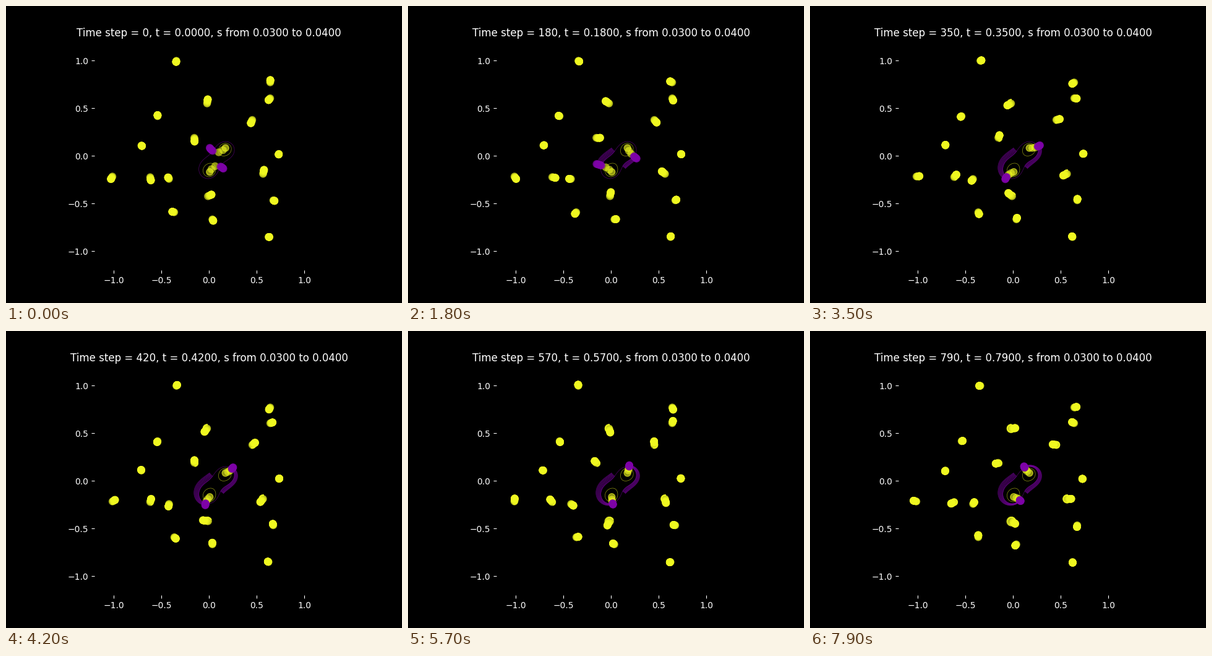
A matplotlib script that plays this animation: 640 by 480 pixels, repeating every 8000 ms.

```python
import numpy as np
import matplotlib.pyplot as plt
from matplotlib.animation import FuncAnimation
from matplotlib.collections import LineCollection

YELLOW, PURPLE = "#f0f921", "#7e03a8"
S_MAX = 0.04
FRAMES, STEP = 80, 10
TRAIL_STEP = 5

# Simple eigenvalues: position, reach, phase and optional skew, skew phase.
ROOTS = [
    (-0.342 + 0.999j, 0.0125, -103),
    (0.643 + 0.772j, 0.026, 88),
    (0.643 + 0.606j, 0.027, 228),
    (-0.0195 + 0.551j, 0.0455, 81),
    (0.4545 + 0.379j, 0.039, 247),
    (-0.539 + 0.418j, 0.0117, 92),
    (-0.154 + 0.191j, 0.0325, -75, 0.27, -34),
    (-0.709 + 0.110j, 0.0078, -40),
    (0.734 + 0.022j, 0.0065, -110),
    (-1.013 - 0.215j, 0.0325, 240),
    (-0.617 - 0.2215j, 0.0365, -78),
    (-0.419 - 0.241j, 0.024, 118, 0.25, -200),
    (0.568 - 0.188j, 0.045, 77),
    (0.675 - 0.465j, 0.0165, -33, 0.2, 126),
    (-0.364 - 0.590j, 0.0227, 166),
    (0.036 - 0.665j, 0.018, -58),
    (0.625 - 0.850j, 0.0084, 0),
    (-0.008 - 0.421j, 0.047, 25, 0.2, -175),
]


def polar(r, deg):
    return r * np.exp(1j * np.radians(deg))


def orbit(w, base, reach, phase, skew=0, skew_phase=0):
    return base + polar(reach, phase) * w / (1 - polar(skew, skew_phase) * w)


def pair(w):
    """The two coupled eigenvalues, followed continuously along w."""
    mid = orbit(w, 0.091 - 0.042j, 0.0214, 145, 0.4, -75)
    disc = orbit(w, (0.0825 + 0.1266j) ** 2, 0.0367, -67, 0.335, -80)
    half = np.sqrt(np.abs(disc)) * np.exp(0.5j * np.unwrap(np.angle(disc)))
    return [mid + half, mid - half]


def paths(s, t):
    """All eigenvalue paths for strength s, shape (roots, times, 2)."""
    w = s / S_MAX * np.exp(2j * np.pi * t)
    z = np.array([orbit(w, *root) for root in ROOTS] + pair(w))
    return np.stack([z.real, z.imag], axis=-1)


def colors(s):
    return [YELLOW] * len(ROOTS) + [PURPLE if s > 0.025 else YELLOW] * 2


t = np.arange(0, 1001, TRAIL_STEP) / 1000
band = np.linspace(0.03, S_MAX, 11)
strengths = [0, 0.01, 0.02, *band]

tracks = [paths(s, t) for s in strengths]
dots = np.concatenate(tracks)
dot_colors = sum((colors(s) for s in strengths), [])
trails = np.concatenate(tracks[3:])
trail_colors = sum((colors(s) for s in band), [])
rings = np.concatenate(tracks[1:4])
ring_colors = sum((colors(s) for s in strengths[1:4]), [])

plt.style.use("dark_background")
fig, ax = plt.subplots(figsize=(6.4, 4.8), dpi=100)
ax.set(xlim=(-1.2, 1.2), ylim=(-1.2, 1.2), aspect="equal")
ticks = np.arange(-1, 1.1, 0.5)
ax.set_xticks(ticks)
ax.set_yticks(ticks)
ax.spines[:].set_visible(False)
title = ax.set_title("")

ax.add_collection(LineCollection(rings, colors=ring_colors, lw=0.5,
                                 alpha=0.6, zorder=1), autolim=False)
trail = LineCollection([], colors=trail_colors, lw=0.5, alpha=0.6, zorder=1)
ax.add_collection(trail, autolim=False)
marks = ax.scatter(*dots[:, 0].T, s=81, c=dot_colors, lw=0, alpha=0.6,
                   zorder=2)


def update(frame):
    n = frame * STEP
    i = n // TRAIL_STEP
    marks.set_offsets(dots[:, i])
    trail.set_segments(trails[:, :i + 1])
    title.set_text(f"Time step = {n}, t = {n / 1000:.4f}, "
                   f"s from 0.0300 to {S_MAX:.4f}")
    return marks, trail, title


anim = FuncAnimation(fig, update, frames=FRAMES, interval=100, repeat=True)
plt.show()
```
